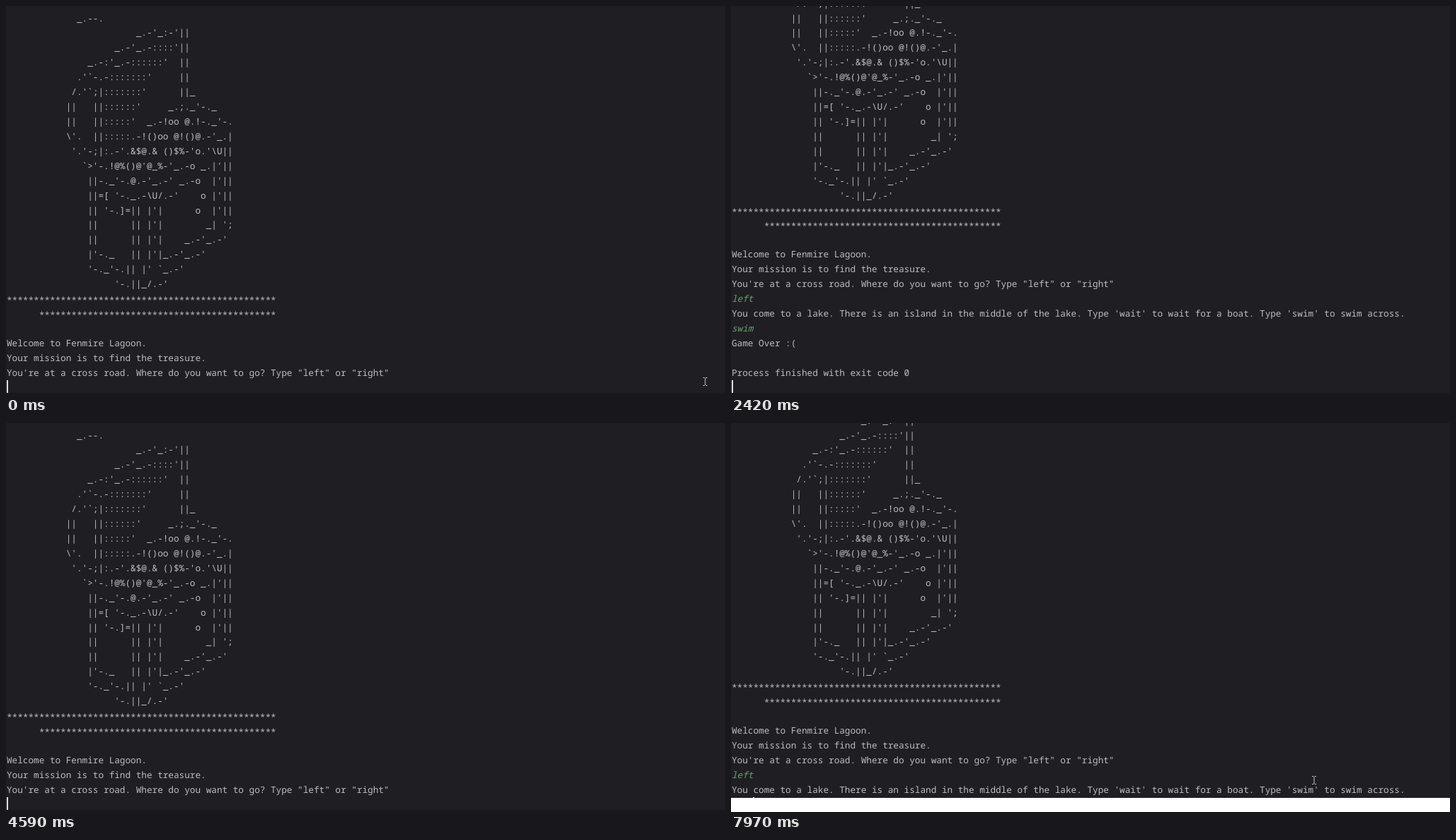
Animation of 1016 by 551 pixels, one loop 8 s. Source, as an HTML page:

```html
<!DOCTYPE html>
<html lang="en">
<head>
<meta charset="utf-8">
<title>Console adventure</title>
<style>
  html, body { margin: 0; width: 100%; height: 100%; overflow: hidden; background: #1f1f23; }
  #stage { position: relative; width: 1016px; height: 551px; overflow: hidden; background: #1f1f23; }
  #rows {
    position: absolute; left: 1px; top: 0; white-space: pre; color: #bcbec4;
    font: 12.692px/20.92px "Noto Sans Mono", "DejaVu Sans Mono", monospace;
    font-variant-ligatures: none; text-rendering: geometricPrecision;
  }
  #rows div { position: absolute; left: 0; height: 20.92px; }
  #rows .typed { color: #6a9f70; font-style: italic; }
  #rows .stars { margin-top: 2px; }
  #caret { position: absolute; width: 1.6px; height: 18px; background: #dfe1e5; }
  #edge { position: absolute; left: 0; top: 548px; width: 100%; height: 3px; background: #1a181e; }
  #strip { position: absolute; left: 0; top: 531px; width: 100%; height: 20px; background: #fff; }
  #mouse { position: absolute; left: -4px; top: -7px; fill: none; stroke: #c4c5c9; }
</style>
</head>
<body>
<div id="stage">
  <div id="rows"></div>
  <div id="caret"></div>
  <svg id="mouse" width="8" height="14"><path d="M1 1.5H3L4 2.5L5 1.5H7M4 2.5V11.5M1 12.5H3L4 11.5L5 12.5H7"/></svg>
  <div id="edge"></div>
  <div id="strip"></div>
</div>
<script type="text/plain" id="art">
             _.--.
                        _.-'_:-'||
                    _.-'_.-::::'||
               _.-:'_.-::::::'  ||
             .'`-.-:::::::'     ||
            /.'`;|:::::::'      ||_
           ||   ||::::::'     _.;._'-._
           ||   ||:::::'  _.-!oo @.!-._'-.
           \'.  ||:::::.-!()oo @!()@.-'_.|
            '.'-;|:.-'.&$@.& ()$%-'o.'\U||
              `>'-.!@%()@'@_%-'_.-o _.|'||
               ||-._'-.@.-'_.-' _.-o  |'||
               ||=[ '-._.-\U/.-'    o |'||
               || '-.]=|| |'|      o  |'||
               ||      || |'|        _| ';
               ||      || |'|    _.-'_.-'
               |'-._   || |'|_.-'_.-'
               '-._'-.|| |' `_.-'
                    '-.||_/.-'
**************************************************
      ********************************************

Welcome to Fenmire Lagoon.
Your mission is to find the treasure.
You're at a cross road. Where do you want to go? Type "left" or "right"
</script>
<script>
const LOOP = 8000, PITCH = 20.92, CHAR = 7.615;
const TOP = 3.5, BOTTOM = 540;   // centres of the first row and of the last visible row
const STRIP_AT = 5000;
const $ = id => document.getElementById(id);
const intro = $('art').textContent.replace(/^\n|\n$/g, '').split('\n');

const over = ['Game Over :(', '', 'Process finished with exit code 0'];
const answers = {
  left: ["You come to a lake. There is an island in the middle of the lake. Type 'wait' to wait for a boat. Type 'swim' to swim across."],
  wait: ['You arrive at the island unharmed. There is a house with 3 doors. One red, one yellow and one blue. Which colour do you choose?']
};

// Each reply: word, first key, time per key, enter.
const rounds = [
  { clear: 0, show: 0, replies: [['right', 340, 65, 690]] },
  { clear: 1120, show: 1250, replies: [['left', 1420, 70, 1700], ['swim', 1980, 70, 2290]] },
  { clear: 2630, show: 2760, replies: [['left', 2930, 68, 3200], ['wait', 3300, 63, 3600], ['red', 3780, 65, 3990]] },
  { clear: 4350, show: 4480, replies: [['left', 4650, 65, 4910], ['wait', 5000, 65, 5260], ['blue', 5360, 65, 5610]] },
  { clear: 5830, show: 5960, replies: [['right', 6120, 65, 6440]] },
  { clear: 6780, show: 6910, replies: [['left', 7080, 75, 7400], ['wait', 7680, 85, LOOP]] }
];

function consoleAt(t) {
  const round = rounds.filter(r => r.clear <= t).pop();
  if (t < round.show) return { lines: [], col: 0, below: 1 };
  const lines = ['', ...intro].map(text => ({ text }));
  for (const [word, start, step, enter] of round.replies) {
    const keys = Math.max(0, Math.min(word.length, Math.floor((t - start) / step) + 1));
    if (t < enter) {
      lines.push({ text: word.slice(0, keys), typed: true });
      return { lines, col: keys, below: 0 };
    }
    lines.push({ text: word, typed: true });
    for (const text of answers[word] || over) lines.push({ text });
  }
  return { lines, col: 0, below: 1 };
}

function drawConsole({ lines, col, below }) {
  const last = lines.length - 1 + below;
  const first = Math.min(TOP, BOTTOM - last * PITCH);
  $('rows').replaceChildren(...lines.map(({ text, typed }, i) => {
    const row = document.createElement('div');
    row.textContent = text;
    row.className = typed ? 'typed' : /^ *\*+$/.test(text) ? 'stars' : '';
    row.style.top = first + (i - 0.5) * PITCH + 'px';
    return row;
  }));
  $('caret').style.left = 1 + col * CHAR + 'px';
  $('caret').style.top = Math.round(first + last * PITCH - 10) + 'px';
}

function mouseAt(t) {
  if (t < 340) return [988, 532];
  if (t < 6500) return null;
  const k = Math.min(1, (t - 6500) / 200), e = k * k * (3 - 2 * k);
  return [973 - 149 * e, 520 - 14 * e];
}

let shown = '';
function frame() {
  const t = performance.now() % LOOP;
  const state = consoleAt(t), key = JSON.stringify(state);
  if (key !== shown) {
    drawConsole(state);
    shown = key;
  }
  const at = mouseAt(t), mouse = $('mouse').style;
  mouse.display = at ? 'block' : 'none';
  if (at) mouse.transform = `translate(${Math.round(at[0])}px, ${Math.round(at[1])}px)`;
  $('strip').style.display = t < STRIP_AT ? 'none' : 'block';
  requestAnimationFrame(frame);
}
frame();
</script>
</body>
</html>
```
